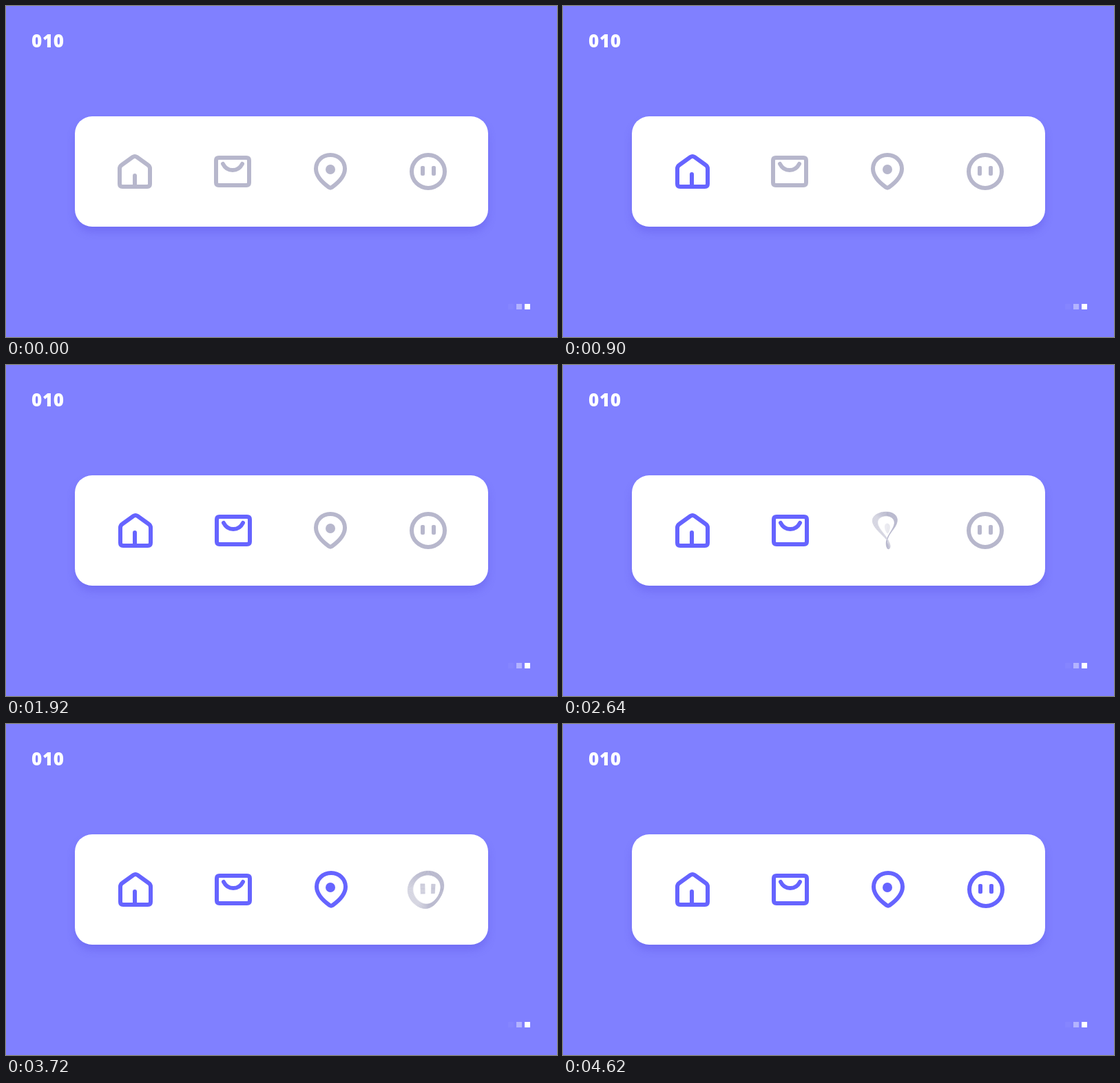
An HTML page with a canvas that plays this animation: 800x480 px, repeating every 6000 ms.

```html
<!DOCTYPE html>
<html>
<head>
<meta charset="utf-8">
<style>
html, body { margin: 0; width: 100%; height: 100%; overflow: hidden; background: #8080ff; }
canvas { display: block; }
</style>
</head>
<body>
<canvas id="stage" width="800" height="480"></canvas>
<script>
const LOOP = 6000, TURN = 490;
const GREY = [183, 183, 204], PURPLE = [102, 100, 255], WHITE = [255, 255, 255];
const ctx = document.getElementById('stage').getContext('2d');

const clamp = v => Math.max(0, Math.min(1, v));
const part = (t, a, b) => clamp((t - a) / (b - a));
const mix = (a, b, k) => a.map((v, i) => v + (b[i] - v) * k);
const rgb = c => `rgb(${c.map(Math.round)})`;
const easeOut = p => 1 - (1 - p) ** 4;
const backOut = p => 1 + 3 * (p - 1) ** 3 + 2 * (p - 1) ** 2;

// Splits a path into cross-sections: pairs of points on both sides of its centre line
function sections(d, width) {
  const path = document.createElementNS('http://www.w3.org/2000/svg', 'path');
  path.setAttribute('d', d);
  const len = path.getTotalLength(), n = Math.ceil(len / 1.2), list = [];
  for (let i = 0; i <= n; i++) {
    const s = len * i / n;
    const p = path.getPointAtLength(s);
    const a = path.getPointAtLength(Math.max(0, s - 0.2));
    const b = path.getPointAtLength(Math.min(len, s + 0.2));
    const dx = b.x - a.x, dy = b.y - a.y, k = width / 2 / (Math.hypot(dx, dy) || 1);
    list.push([[p.x - dy * k, p.y + dx * k], [p.x + dy * k, p.y - dx * k]]);
  }
  return list;
}

function line(d, color, width = 6) {
  ctx.lineWidth = width;
  ctx.strokeStyle = color;
  ctx.stroke(new Path2D(d));
}

function disc(x, y, r, color) {
  ctx.fillStyle = color;
  ctx.beginPath();
  ctx.arc(x, y, r, 0, Math.PI * 2);
  ctx.fill();
}

function eyes(w, h, color) {
  ctx.fillStyle = color;
  ctx.beginPath();
  for (const x of [-8, 8]) ctx.roundRect(x - w / 2, -1 - h / 2, w, h, Math.min(2, h / 2));
  ctx.fill();
}

const smile = (y, c) => `M-14,${y} C-8,${c} 8,${c} 14,${y}`;

// inner: flat grey detail, pop: purple detail t ms after the icon starts to turn
const icons = [
  {
    frame: 'M-22,-4 Q-22,-7.5 -19,-9.5 L-3,-21 Q0,-23 3,-21 L19,-9.5 Q22,-7.5 22,-4 V18 Q22,22 18,22 H-18 Q-22,22 -22,18 Z',
    inner: ['M0,22 V3'],
    rest: c => line('M0,22 V6', c),
    pop(t, c) {
      if (t > 490) line(`M-1,22 V${22 - 19 * easeOut(part(t, 490, 1200))}`, c);
    }
  },
  {
    frame: 'M-20,-20 H20 Q24,-20 24,-16 V16 Q24,20 20,20 H-20 Q-24,20 -24,16 V-16 Q-24,-20 -20,-20 Z',
    inner: [smile(-11, 1)],
    rest: c => line(smile(-11, 1), c),
    pop(t, c) {
      if (t > 400) line(smile(-11, -11 + 12 * backOut(part(t, 400, 665))), c);
    }
  },
  {
    frame: 'M0,-24 C12,-24 21,-15 21,-4 C21,8 9,18 2,23 Q0,24.2 -2,23 C-9,18 -21,8 -21,-4 C-21,-15 -12,-24 0,-24 Z',
    inner: ['M3.5,-3 A3.5,3.5 0 1 1 -3.5,-3 A3.5,3.5 0 1 1 3.5,-3'],
    innerWidth: 7,
    rest: c => disc(0, -3, 7, c),
    pop(t, c) {
      if (t > 445) disc(-1, -3, 7 * Math.max(0, backOut(part(t, 445, 1100))), c);
    }
  },
  {
    frame: 'M24,0 A24,24 0 1 1 -24,0 A24,24 0 1 1 24,0 Z',
    inner: ['M-8,-8 V6', 'M8,-8 V6'],
    rest: c => eyes(6, 14, c),
    pop(t, c) {
      if (t < 340) return;
      const open = t < 580 ? part(t, 450, 580) : t < 720 ? 1 - part(t, 580, 720) : part(t, 720, 955);
      const k = (1 - Math.cos(open * Math.PI)) / 2;
      eyes(12 - 6 * k, 4 + 10 * k, c);
    }
  }
];
for (const icon of icons) {
  icon.outer = sections(icon.frame, 6);
  icon.details = icon.inner.map(d => sections(d, icon.innerWidth || 6));
}

// Turns the plane around its vertical axis, lower rows ahead of upper ones
function twist([x, y], phi) {
  x -= 0.5;
  const angle = phi + y / 27 * Math.sin(phi);
  const z = -x * Math.sin(angle);
  return [x * Math.cos(angle) / (1 - z / 64), y / (1 - z / 88), z];
}

function ribbon(list, phi, color) {
  const pts = list.map(pair => pair.map(p => twist(p, phi)));
  ctx.lineWidth = 0.4;
  for (let i = 1; i < pts.length; i++) {
    const [a, b] = pts[i - 1], [c, d] = pts[i];
    const light = Math.min(0.4, Math.max(0, (a[2] + b[2]) / 2 / 27 * 1.2));
    ctx.fillStyle = ctx.strokeStyle = rgb(mix(color, WHITE, light));
    ctx.beginPath();
    for (const p of [a, b, d, c]) ctx.lineTo(p[0], p[1]);
    ctx.closePath();
    ctx.fill();
    ctx.stroke();
  }
}

function drawIcon(icon, i, t) {
  ctx.save();
  ctx.translate(187.5 + 142 * i, 240);
  if (t > 0 && t < TURN) {
    const phi = Math.PI * t / TURN;
    const fade = part(t, 0, 270);
    if (fade < 1) for (const d of icon.details) ribbon(d, phi, mix(GREY, WHITE, fade));
    ribbon(icon.outer, phi, mix(GREY, PURPLE, part(t, 230, 430)));
  }
  ctx.translate(t > 0 ? 0.5 : -0.5, 0);
  if (t <= 0) {
    line(icon.frame, rgb(GREY));
    icon.rest(rgb(GREY));
  } else {
    if (t >= TURN) line(icon.frame, rgb(PURPLE));
    icon.pop(t, rgb(PURPLE));
  }
  ctx.restore();
}

function draw(now) {
  const t = now % LOOP;
  ctx.fillStyle = '#8080ff';
  ctx.fillRect(0, 0, 800, 480);

  ctx.fillStyle = '#fff';
  ctx.font = '800 26px "Open Sans", sans-serif';
  ctx.letterSpacing = '0.7px';
  ctx.fillText('010', 37, 59.5);
  [0.04, 0.4, 1].forEach((alpha, i) => {
    ctx.fillStyle = `rgba(255,255,255,${alpha})`;
    ctx.fillRect(729 + 12 * i, 432, 8, 8);
  });

  ctx.save();
  ctx.shadowColor = 'rgba(80,70,220,.28)';
  ctx.shadowBlur = 12;
  ctx.shadowOffsetY = 8;
  ctx.fillStyle = '#fff';
  ctx.beginPath();
  ctx.roundRect(100, 160, 600, 160, 25);
  ctx.fill();
  ctx.restore();

  ctx.lineCap = ctx.lineJoin = 'round';
  icons.forEach((icon, i) => drawIcon(icon, i, t - 50 - 1205 * i));
}

const start = performance.now();
function tick() {
  draw(performance.now() - start);
  requestAnimationFrame(tick);
}
tick();
</script>
</body>
</html>
```
